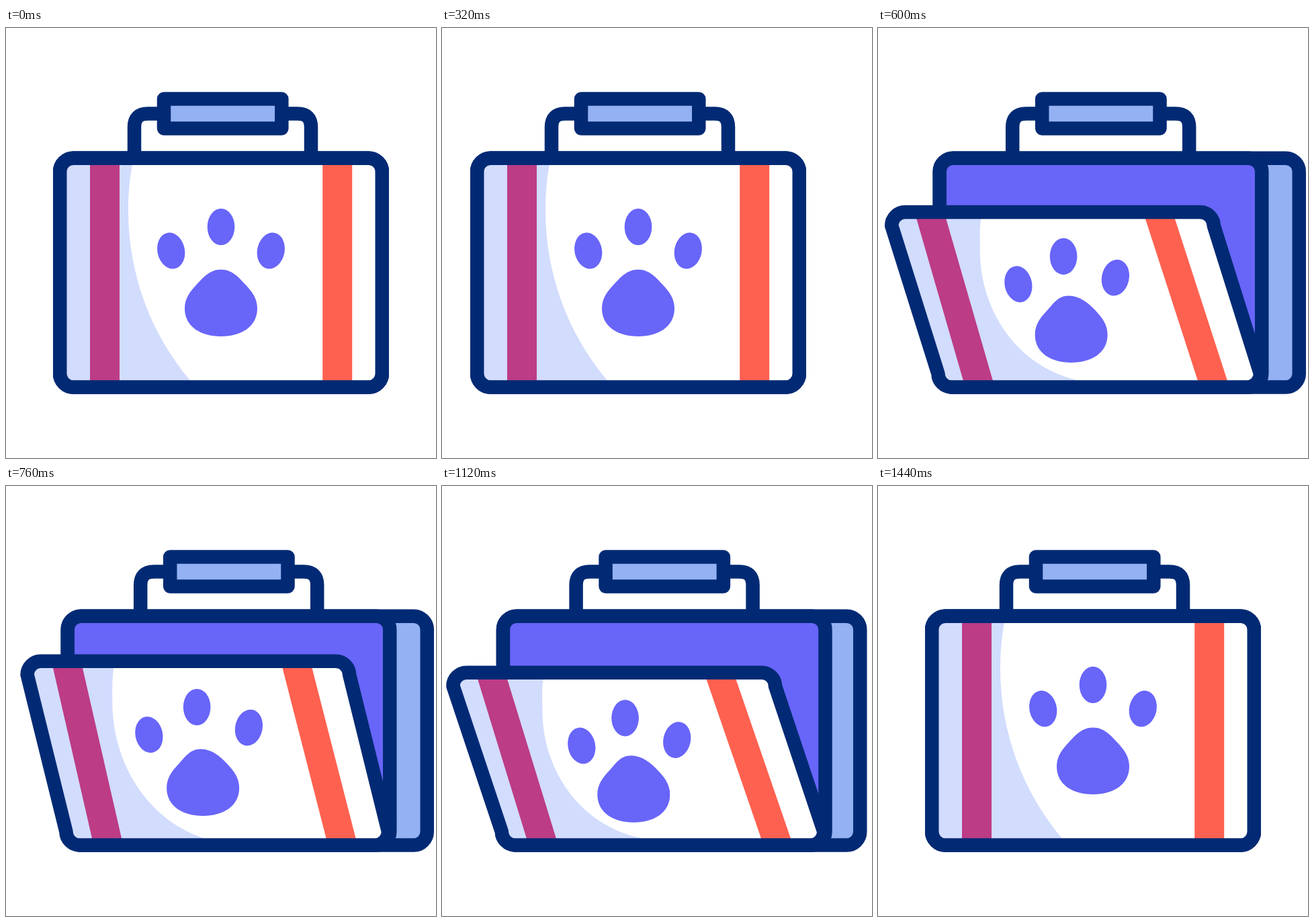
An HTML page with a canvas that plays this animation: 640 by 640 pixels, repeating every 1480 ms.

```html
<!DOCTYPE html>
<html lang="en">
<head>
<meta charset="utf-8">
<title>Pet first-aid case</title>
<style>
  html, body { margin: 0; width: 100%; height: 100%; overflow: hidden; background: #fff; }
  canvas { display: block; width: 100vmin; height: 100vmin; }
</style>
</head>
<body>
<canvas id="stage" width="640" height="640"></canvas>
<script>
const ctx = document.getElementById('stage').getContext('2d');
const LOOP = 1480, STEP = 40, LINE = 20.5;
const TOP = 193.75, BOTTOM = 534.5, LEFT = 80.25, RIGHT = 559.75, RADIUS = 20;
const NAVY = '#022a74', SKY = '#93b1f3', VIOLET = '#6865f9',
      SHADE = '#d2dcfd', MAGENTA = '#bc3c85', CORAL = '#ff6150';

// Paw parts: resting centre, tilt, and offsets with the lid wide open and at rest
const toes = [
  { x: 245.7, y: 331.5, tilt: -12, wide: [-49, 58], rest: [-42, 38.5] },
  { x: 320, y: 296, tilt: 0, wide: [-59, 52], rest: [-45, 33] },
  { x: 394.3, y: 331.5, tilt: 12, wide: [-56, 49], rest: [-42, 28] }
];
const pad = { x: 320, y: 359.5, wide: [-45.6, 44], rest: [-36, 32] };

const clamp = x => Math.min(1, Math.max(0, x));
const progress = (t, from, to) => clamp((t - from) / (to - from));
const ease = (t, from, to) => (1 - Math.cos(Math.PI * progress(t, from, to))) / 2;

function poseAt(t) {
  const open = ease(t, 320, 560) - ease(t, 1060, 1420);
  const settle = (1 - (1 - progress(t, 560, 800)) ** 3) * (1 - ease(t, 990, 1060));
  const lean = t < 1000 ? -28 * ease(t, 110, 320) * (1 - open) : 0;
  return {
    open, settle,
    drop: (90 - 23 * settle) * open,
    shift: lean + 9.2 * open,
    body: lean + 11.5 * open,
    far: lean + 67 * open
  };
}

function paint(path, fill, line) {
  if (fill) { ctx.fillStyle = fill; ctx.fill(path); }
  if (line) { ctx.strokeStyle = NAVY; ctx.lineWidth = LINE; ctx.stroke(path); }
}

function box(left, right) {
  const path = new Path2D();
  path.roundRect(left, TOP, right - left, BOTTOM - TOP, RADIUS);
  return path;
}

function handle() {
  paint(new Path2D('M191 190V147.5Q191 127.5 211 127.5H434Q454 127.5 454 147.5V190'), null, true);
  paint(new Path2D('M235 105.5H410.3V149.5H235Z'), SKY, true);
}

// The top edge slides down and left while the bottom edge stays put
function lidPath(drop) {
  const slide = 0.862 * drop, k = RADIUS * 0.45;
  const l = LEFT - slide, r = RIGHT - slide, top = TOP + drop;
  const low = BOTTOM - RADIUS, high = top + RADIUS;
  return new Path2D(
    `M${l} ${high}C${l} ${top + k} ${l + k} ${top} ${l + RADIUS} ${top}` +
    `H${r - RADIUS}C${r - k} ${top} ${r} ${top + k} ${r} ${high}` +
    `L${RIGHT} ${low}C${RIGHT} ${BOTTOM - k} ${RIGHT - k} ${BOTTOM} ${RIGHT - RADIUS} ${BOTTOM}` +
    `H${LEFT + RADIUS}C${LEFT + k} ${BOTTOM} ${LEFT} ${BOTTOM - k} ${LEFT} ${low}Z`);
}

function shadePath(d) {
  const at = (x, y, kx, ky) => `${x + kx * d} ${y + ky * d}`;
  return new Path2D(
    `M-40 ${200 + d}L${at(188.5, 200, -0.55, 1)}` +
    `C${at(184, 224, -0.53, 0.95)} ${at(182, 246, -0.49, 0.85)} ${at(182, 272, -0.49, 0.75)}` +
    `C${at(182, 368, -0.49, 0.55)} ${at(217, 457, -0.33, 0.54)} ${at(273.5, 524, 0.16, 0)}` +
    `V530H-40Z`);
}

function stripe(x, drop, topSlide, bottomSlide, color) {
  const a = x - topSlide * drop, b = x - bottomSlide * drop, w = 44;
  paint(new Path2D(`M${a} ${203 + drop}h${w}L${b + w} 525h${-w}Z`), color);
}

function place(part, { open, settle }) {
  const bow = open + 0.26 * open * (1 - open);
  const along = i => (part.wide[i] + (part.rest[i] - part.wide[i]) * settle) * bow;
  return [part.x + along(0), part.y + along(1)];
}

function paw(pose) {
  for (const toe of toes) {
    const path = new Path2D();
    path.ellipse(...place(toe, pose), 20.3, 27.2, toe.tilt * Math.PI / 180, 0, 2 * Math.PI);
    paint(path, VIOLET);
  }
  const [x, y] = place(pad, pose), tip = -0.045 * pose.drop;
  paint(new Path2D(
    `M${x + tip} ${y}C${x + tip + 16} ${y} ${x + 26} ${y + 11} ${x + 36} ${y + 22}` +
    `C${x + 46} ${y + 32.5} ${x + 54} ${y + 43} ${x + 54} ${y + 58}` +
    `C${x + 54} ${y + 85} ${x + 30} ${y + 99.5} ${x} ${y + 99.5}` +
    `C${x - 30} ${y + 99.5} ${x - 54} ${y + 85} ${x - 54} ${y + 58}` +
    `C${x - 54} ${y + 43} ${x - 46} ${y + 32.5} ${x - 36} ${y + 22}` +
    `C${x - 26} ${y + 11} ${x + tip - 16} ${y} ${x + tip} ${y}Z`), VIOLET);
}

function lid(pose) {
  const { drop } = pose, outline = lidPath(drop);
  paint(outline, '#fff');
  ctx.save();
  ctx.clip(outline);
  paint(shadePath(drop), SHADE);
  stripe(125, drop, 0.96, 0.09, MAGENTA);
  stripe(471.2, drop, 1.03, 0.055, CORAL);
  paw(pose);
  ctx.restore();
  paint(outline, null, true);
}

function draw(t) {
  const pose = poseAt(t);
  ctx.setTransform(1, 0, 0, 1, 0, 0);
  ctx.fillStyle = '#fff';
  ctx.fillRect(0, 0, 640, 640);
  ctx.lineJoin = 'round';

  ctx.save();
  ctx.translate(pose.shift, 0);
  handle();
  ctx.restore();

  paint(box(LEFT + pose.body, RIGHT + pose.far), SKY, true);
  paint(box(LEFT + pose.body, RIGHT + pose.body), VIOLET, true);

  ctx.translate(pose.shift, 0);
  lid(pose);
}

const start = performance.now();
function tick() {
  const t = (performance.now() - start) % LOOP;
  draw(Math.floor(t / STEP) * STEP);
  requestAnimationFrame(tick);
}
tick();
</script>
</body>
</html>
```
